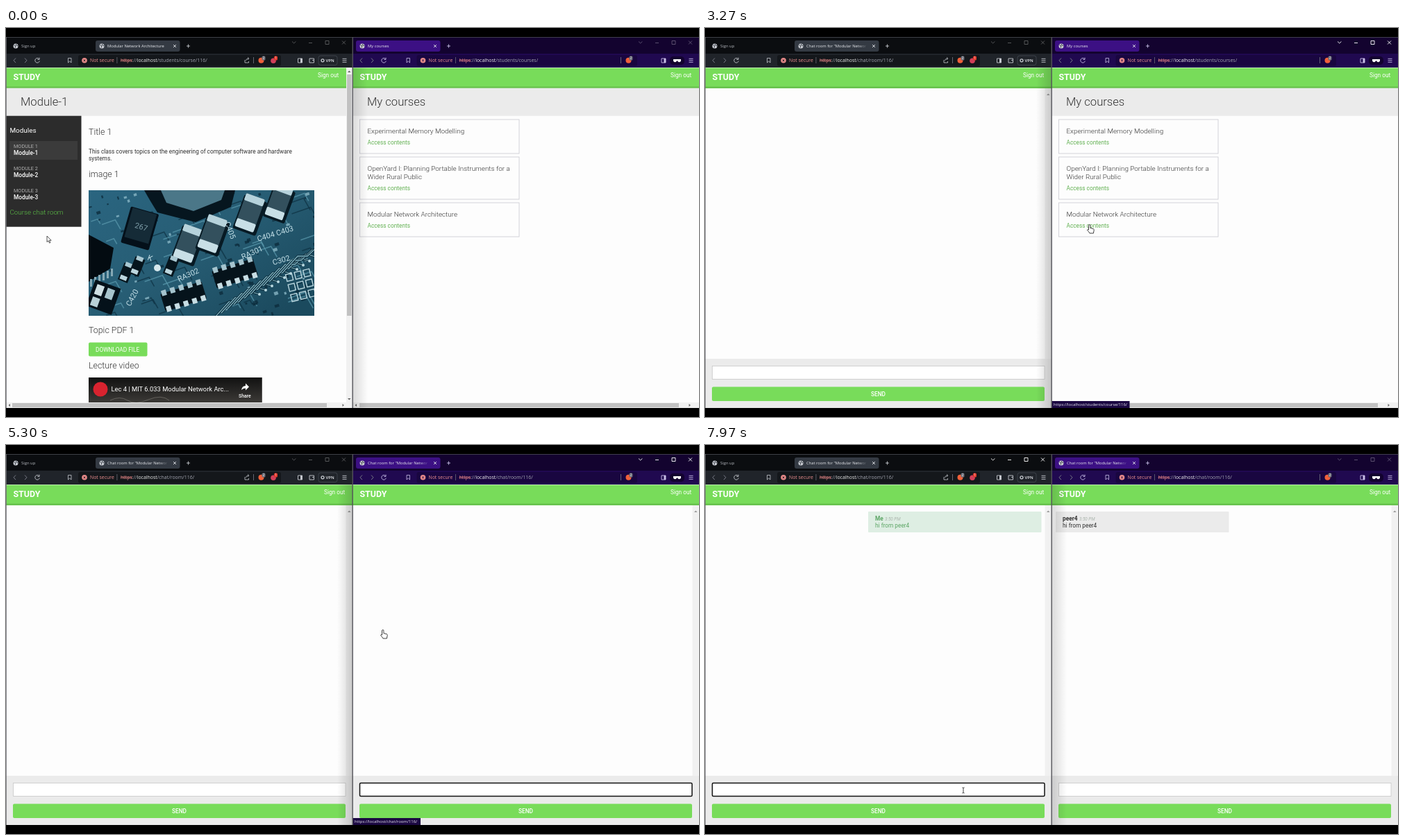
Recreate the animation shown at these times as an HTML page. Size 998 by 561 pixels, loop 8000 ms.

```html
<!DOCTYPE html>
<html lang="en">
<head>
<meta charset="utf-8">
<title>Course chat</title>
<style>
html,body{margin:0;width:100%;height:100%;overflow:hidden;background:#000}
svg{display:block;width:100vw;height:100vh}
text{font-family:Roboto,sans-serif;white-space:pre}
.ui{font-family:"Open Sans",sans-serif}
</style>
</head>
<body>
<svg id="stage" viewBox="0 0 998 561"></svg>
<script>
const LOOP = 8000, GREEN = '#78dc5a', LINK = '#63b153', INK = '#333';
const COURSE = 'Modular Network Architecture', SITE = 'STUDY', USER = 'peer4';
const MESSAGE = 'hi from ' + USER;
const HOST = '://localhost/';
const URLS = { course: 'students/course/116/', courses: 'students/courses/', chat: 'chat/room/116/' };

const rect = (x, y, w, h, fill, more = '') =>
  `<rect x="${x}" y="${y}" width="${w}" height="${h}" fill="${fill}" ${more}/>`;
const text = (x, y, size, fill, s, more = '') =>
  `<text x="${x}" y="${y}" font-size="${size}" fill="${fill}" ${more}>${s}</text>`;
const ui = (x, y, size, fill, s, more = '') => text(x, y, size, fill, s, `class="ui" ${more}`);
const line = (d, stroke, w = 0.9, more = '') =>
  `<path d="${d}" fill="none" stroke="${stroke}" stroke-width="${w}" ${more}/>`;
const dot = (x, y, r, fill) => `<circle cx="${x}" cy="${y}" r="${r}" fill="${fill}"/>`;
const group = (id, s, more = '') => `<g id="${id}" ${more}>${s}</g>`;
const LIGHT = 'font-weight="300"', MEDIUM = 'font-weight="500"', BOLD = 'font-weight="700"';

function globe(x) {
  return dot(x, 26, 3.5, '#c9ccd2') +
    line(`M${x - 2.6} 24.5l2.4 1.2l-.6 2.8M${x + .8} 23l-.4 1.6l2.6 1.2`, '#3a4048', 1);
}
const cross = (x, y, r, c) => line(`M${x - r} ${y - r}l${2 * r} ${2 * r}m0 ${-2 * r}l${-2 * r} ${2 * r}`, c);

// Circuit board picture, drawn in its own 325 x 181 box
function board() {
  let seed = 7;
  const rnd = () => (seed = seed * 16807 % 2147483647) / 2147483647;
  const part = (x, y, a, s) => `<g transform="translate(${x} ${y}) rotate(${a})">${s}</g>`;
  const cap = (x, y, k = 1) => part(x, y, 20, `<g transform="scale(${k})">` +
    rect(-17, -24, 37, 54, '#071a24', 'rx="3"') + rect(-15, -27, 30, 52, '#33505d', 'rx="2"') +
    rect(-15, -27, 30, 11, '#b6d2db', 'rx="2"') + rect(-15, 13, 30, 13, '#c8dfe6', 'rx="2"') + '</g>');
  const small = (x, y) => part(x, y, 22, rect(-7, -11, 15, 26, '#06151d') +
    rect(-5, -13, 10, 6, '#a9c8d2') + rect(-5, 7, 10, 6, '#bcd6de'));
  const array = (x, y) => {
    let s = rect(-31, -11, 62, 26, '#05131b', 'rx="2"');
    for (let i = 0; i < 5; i++) s += rect(-29 + i * 13, -15, 7, 8, '#a5c4ce') + rect(-29 + i * 13, 9, 7, 8, '#c7dde3');
    return part(x, y, -17, s);
  };
  const label = (x, y, a, s) => part(x, y, a, text(0, 0, 11, '#c4e0e8', s));
  let s = rect(0, 0, 325, 181, 'url(#pcb)');
  for (let i = 0; i < 60; i++) {
    const x = rnd() * 325, y = rnd() * 181, l = 8 + rnd() * 20;
    s += line(`M${x} ${y}l${l} ${-l * .35}l${l * .4} ${l * .7}`, i % 2 ? '#0d3142' : '#5b9aae', 1.6, 'opacity=".7"');
  }
  for (let i = 0; i < 90; i++)
    s += part(rnd() * 325, rnd() * 181, -18, rect(0, 0, 2 + rnd() * 5, 2 + rnd() * 3, i % 3 ? '#0b2a39' : '#8fbccb', 'opacity=".75"'));
  for (let i = 0; i < 12; i++) {
    const x = 182 + i * 9, y = 183 - i * 6;
    s += line(`M${x} ${y}l20 -22h14l16 -15l14 4`, '#0a2735', 3.2) + line(`M${x} ${y}l20 -22h14l16 -15l14 4`, '#7fb3c2', 1.3) +
      dot(x + 64, y - 33, 2, '#b9d8e0');
  }
  s += '<path d="M80 0H211L205 24L154 46L99 32L88 14Z" fill="#06161f"/><path d="M104 0H196L191 14L151 30L112 18Z" fill="#4b7788"/>';
  s += part(74, 54, 16, rect(-21, -26, 42, 54, '#04101a', 'rx="2"') + rect(-18, -25, 36, 44, '#152b37') + text(-8, 2, 11, '#7f9ea9', '267'));
  s += cap(143, 77, .95) + cap(178, 63, .95) + cap(232, 33, .95) + cap(274, 17, .9);
  s += '<path d="M0 64L36 83L31 113L0 132Z" fill="#030b11"/>';
  for (let i = 0; i < 6; i++) s += rect(2 + i * 6, 128 - i * 3, 3, 11, '#86a9b5');
  s += small(54, 117) + small(70, 108) + small(119, 108) + dot(99, 112, 5, '#d5e8ed');
  s += array(210, 118) + array(136, 151);
  s += part(18, 153, 20, rect(-16, -20, 39, 40, '#04111a') + rect(-11, -15, 11, 15, '#cfe0e4') + rect(5, -15, 11, 15, '#a7c4cd') + rect(-11, 4, 11, 13, '#b8d0d7'));
  s += label(130, 132, -24, 'RA302') + label(222, 100, -24, 'RA301') + label(244, 74, -17, 'C404 C403') +
    label(266, 108, -16, 'C302') + label(84, 100, 20, 'K') + label(196, 47, 70, 'C405') + label(60, 168, -62, 'C420');
  s += '<g fill="none" stroke="#b9d6de" stroke-width="1.4">';
  for (let i = 0; i < 9; i++) s += `<rect x="${286 + i % 3 * 13}" y="${118 + (i / 3 | 0) * 15}" width="9" height="10" transform="rotate(-14 300 130)"/>`;
  return s + '</g>';
}

function header(out) {
  return rect(0, 57.5, 499, 29.5, GREEN) + rect(0, 84.5, 499, 2.2, '#66bf4c') +
    text(10.5, 75, 12.4, '#fff', SITE, BOLD) + text(out, 70.5, 8.3, '#fff', 'Sign out');
}
const banner = s => rect(0, 86.7, 499, 40, '#ebebeb') + text(21, 112, 16.6, INK, s, LIGHT);

function hScroll(x, end) {
  return rect(0, 540, 499, 8, '#f1f1f1') + rect(x, 541, end - x, 6, '#c1c1c1') +
    '<path d="M6 542v4l-2.4-2zM484.5 542v4l2.4-2z" fill="#666"/>';
}

function coursePage(p) {
  let s = rect(0, 57, 499, 491, '#fdfdfd') + header(449) + banner('Module-1');
  s += rect(0, 126.7, 108.5, 160, '#2c2c2c') + text(5.5, 151, 9.9, '#fff', 'Modules') + rect(5, 163, 98, 27, '#3b3b3b');
  for (let i = 0; i < 3; i++)
    s += text(11, 173 + i * 32.2, 7.3, '#b0b0b0', 'MODULE ' + (i + 1)) +
      text(11, 183 + i * 32.2, 8.3, '#fff', 'Module-' + (i + 1), MEDIUM);
  s += text(5.5, 269, 9.8, '#5fc748', 'Course chat room', LIGHT);
  s += [['Title 1', 154], ['image 1', 215], ['Topic PDF 1', 440], ['Lecture video', 491]]
    .map(([t, y]) => text(119, y, 12.4, INK, t, LIGHT)).join('');
  s += text(119, 180.5, 8.3, INK, 'This class covers topics on the engineering of computer software and hardware') +
    text(119, 190.5, 8.3, INK, 'systems.');
  s += `<svg x="119" y="234" width="325" height="181" viewBox="0 0 325 181">${board()}</svg>`;
  s += rect(119, 453.5, 84.5, 20, GREEN, 'rx="2"') + text(129, 466.5, 8.3, '#fff', 'DOWNLOAD FILE');
  s += rect(119, 504, 249.5, 36, '#000');
  s += group(p + 'video', rect(119, 504, 249.5, 36, 'url(#film)') + line('M150 537q14 -7 25 0t30 -1t30 1', '#77756f', .7) +
    dot(136, 521, 10.5, '#d8232f') +
    text(151.5, 524, 9.4, '#fff', 'Lec 4 | MIT 6.033 Modular Network Arc...') +
    '<path d="M339 522q1-6 6-6v-3.5l5 5l-5 5v-3q-4 0-6 2.5z" fill="#fff"/>' + text(335, 532.5, 6.9, '#fff', 'Share', MEDIUM));
  s += rect(490, 57, 9, 483, '#f1f1f1') + rect(491, 67, 6.5, 348, '#c1c1c1') +
    '<path d="M492 64h4.6l-2.3-2.6zM492 534h4.6l-2.3 2.6z" fill="#666"/>';
  return s + hScroll(9, 462);
}

function coursesPage() {
  const card = (y, h, lines) => rect(10.5, y + .5, 229.5, h, '#fdfdfd', 'stroke="#c9c9d0" stroke-width=".8"') +
    lines.map((t, i) => text(21.5, y + 20.5 + i * 12, 9.9, INK, t, LIGHT)).join('') +
    text(21.5, y + h - 13, 8.3, LINK, 'Access contents');
  return rect(0, 57, 499, 491, '#fdfdfd') + header(458) + banner('My courses') +
    card(131.5, 49, ['Experimental Memory Modelling']) +
    card(185.5, 61, ['OpenYard I: Planning Portable Instruments for a', 'Wider Rural Public']) +
    card(251.5, 49, [COURSE]) + hScroll(10, 470);
}

function chatPage(p, mine) {
  const x = mine ? 235 : 6, ink = mine ? '#5da666' : INK, wide = mine ? 14 : 24;
  return rect(0, 57, 499, 491, '#fdfdfd') + header(458) +
    rect(489.5, 87, 9, 390, '#f1f1f1') + '<path d="M492 97h4.6l-2.3-2.6z" fill="#999"/>' +
    rect(0, 477, 499, 71, '#ebebeb') +
    group(p + 'msg', rect(x, 96, 249.5, 30, mine ? '#deeee3' : '#ebebeb', 'rx="1"') +
      text(x + 10, 109, 8.3, ink, mine ? 'Me' : USER, BOLD) +
      text(x + 10 + wide, 109, 6.3, '#a9b3ab', '3:50 PM', 'font-style="italic"') +
      text(x + 10, 119, 8.3, ink, MESSAGE)) +
    rect(10.5, 487.5, 478.5, 19, '#fff', `id="${p}input"`) + text(16, 500, 8.3, INK, '', `id="${p}typed"`) +
    rect(10, 517.5, 479, 20.5, GREEN, 'rx="2"') + text(249.5, 531, 8.3, '#fff', 'SEND', 'text-anchor="middle" ' + MEDIUM);
}

function chrome(p, k) {
  const c = k.icon, ax = k.tabX, dim = '#777a85';
  let s = rect(0, 13, 499, 535, k.bar) + rect(0, 37, 499, 20.5, k.tool) + rect(ax, 18, 121.5, 16, k.tab, 'rx="3"');
  if (ax > 100) s += globe(14) + ui(22, 28.2, 5.9, '#b7bac0', 'Sign up');
  s += group(p + 'icon', globe(ax + 9)) +
    group(p + 'spin', line(`M${ax + 9} 22.7a3.3 3.3 0 1 1 -3.3 3.3`, '#d8d2f0', 1) + dot(ax + 9, 26, 1, '#d8d2f0')) +
    ui(ax + 17, 28.2, 5.8, '#e8eaee', '', `id="${p}title"`) +
    rect(ax + 91, 19, 14, 14, `url(#${p}fade)`, `id="${p}cut"`) + rect(ax + 104, 19, 16, 14, k.tab) +
    cross(ax + 114, 26, 2, '#dfe1e6') + line(`M${ax + 131} 26h5m-2.5-2.5v5`, c);
  s += group(p + 'ctl', line('M412 19.5l2.7 2.5l2.7-2.5M436 21.5h5M460 18.5h5v5h-5z', '#fff') + cross(486.5, 21, 2.5, '#fff'));
  s += line('M14 43.5l-3 3.3l3 3.3', dim, 1) + line('M27 43.5l3 3.3l-3 3.3', dim, 1) +
    group(p + 'reload', line('M47.5 44.5a3.3 3.3 0 1 0 .8 3.2M48 42.7v2.7h-2.7', c)) +
    group(p + 'stop', cross(45, 46.8, 2.3, c));
  const u = k.urlX;
  s += line(`M${u - 75.5} 43.5h4.5v6.5l-2.25-2l-2.25 2z`, c, .8) +
    rect(u - 61, 39, k.fieldEnd - u + 61, 16, k.field, 'rx="3"') +
    dot(u - 52, 46.8, 3.8, '#e88a8a') + cross(u - 52, 46.8, 1.3, k.field) +
    ui(u - 44, 49.3, 6.9, '#ee9090', 'Not secure') + rect(u - 5.5, 42, .8, 9, '#666a74') +
    ui(u, 49.3, 6.95, '#a3a5b0', `<tspan fill="#ee8a8a" text-decoration="line-through">https</tspan>:/` +
      `/<tspan fill="#eee">localhost</tspan>/<tspan id="${p}url"></tspan>`);
  const b = k.shield;
  s += rect(b - 11.5, 42, .8, 9, '#777a85') + dot(b, 46.8, 4, '#f0603a') +
    group(p + 'badge', rect(b + 1, 40.5, 5, 6, '#6a6d78', 'rx="1.5"') + ui(b + 2.2, 45.3, 4.4, '#fff', '2'));
  if (k.extra) {
    s += line('M344 46v4h5.5v-2M345.5 47q.5-3 4-3m-1.5-1.7l1.8 1.7l-1.8 1.7', c, .8) +
      dot(385, 47.3, 3.8, '#d0405a') + rect(386, 40.5, 5, 6, '#e0392c', 'rx="1.5"') + ui(387.3, 45.3, 4.4, '#fff', '1') +
      line('M437 44h6.5v6h-6.5zM441 46.5h2.5', c, .9) +
      rect(450, 40, 27, 13.5, 'none', 'rx="3" stroke="#4a5058" stroke-width=".7"') +
      `<circle cx="456" cy="46.8" r="2" fill="none" stroke="${c}" stroke-width="1.3"/>` + ui(460.5, 49, 6, '#e8eaee', 'VPN', 'font-weight="600"');
  } else {
    s += rect(457, 41, 21, 12, k.bar, 'rx="5"') +
      '<path d="M462 45h11v2.2q-.5 2-2.5 2t-2.5-2h-1q-.5 2-2.5 2t-2.5-2z" fill="#fff"/>';
  }
  const sx = k.extra ? 420.5 : 445;
  s += line(`M${sx} 44h6v6h-6z`, c) + rect(sx + 3.5, 44, 2.5, 6, c) + line('M484.5 44.3h6m-6 2.5h6m-6 2.5h6', c, .9);
  return s;
}

const skins = {
  L: { bar: '#0b0d10', tool: '#20242a', field: '#14171b', tab: '#343a43', icon: '#c6c9cf', tabX: 129, urlX: 165, fieldEnd: 396, shield: 367.5, extra: true },
  R: { bar: '#13032f', tool: '#200950', field: '#190640', tab: '#3c1084', icon: '#c9bfe8', tabX: 5, urlX: 153.5, fieldEnd: 410, shield: 397.5 }
};

function browser(p, x) {
  const k = skins[p];
  return `<svg x="${x}" y="0" width="499" height="561" viewBox="0 0 499 561">` +
    chrome(p, k) + group(p + 'course', coursePage(p)) +
    (p === 'R' ? group(p + 'courses', coursesPage()) : '') + group(p + 'chat', chatPage(p, p === 'L')) +
    group(p + 'shade', rect(p === 'L' ? 477 : 0, 57, 22, 491, `url(#${p}dark)`)) +
    group(p + 'status', rect(0, 538, 98, 10, p === 'L' ? '#101215' : '#1b0842', `id="${p}box"`) +
      ui(3, 545.3, 5.9, '#e6e6ee', '', `id="${p}link"`)) +
    rect(0, 13, 499, .7, '#55585f') + rect(0, 13, .8, 535, '#6a6a70') + '</svg>';
}

const stop = (o, c, a = 1) => `<stop offset="${o}" stop-color="${c}" stop-opacity="${a}"/>`;
const grad = (id, stops, dir = '') => `<linearGradient id="${id}" ${dir}>${stops}</linearGradient>`;
const hand = 'M-1.5 1q0-1.5 1.2-1.5t1.2 1.5v3.5l4.5 1.2q1 .4 .8 1.8l-.8 4.5h-5.4q-1.5-2.6-3.5-4.6q.4-1.6 2 -.4z';
const stage = document.getElementById('stage');
stage.innerHTML = '<defs>' +
  grad('pcb', stop(0, '#2a6580') + stop(.5, '#275d74') + stop(1, '#1b4a5e'), 'x2="1" y2=".8"') +
  grad('film', stop(0, '#111') + stop(1, '#3c3a37'), 'x2="0" y2="1"') +
  grad('Ldark', stop(0, '#000', 0) + stop(1, '#000', .16)) + grad('Rdark', stop(0, '#000', .14) + stop(1, '#000', 0)) +
  ['L', 'R'].map(p => grad(p + 'fade', stop(0, skins[p].tab, 0) + stop(1, skins[p].tab))).join('') + '</defs>' +
  rect(0, 0, 998, 561, '#000') + browser('L', 0) + browser('R', 499) + rect(498.5, 13, 1, 535, '#4a4a50') +
  group('pointer',
    group('arrow', '<path d="M0 0v8.6l2-1.8l1.5 3.3l1.4-.6l-1.5-3.2h2.7z" fill="#fff" stroke="#111" stroke-width=".7"/>') +
    group('hand', `<path d="${hand}" fill="#fff" stroke="#111" stroke-width=".8"/>`) +
    group('beam', line('M-1.6 -4q1.6 0 1.6 .8v6.4q0 .8 -1.6 .8M1.6 -4q-1.6 0-1.6 .8m0 6.4q0 .8 1.6 .8', '#111', .8)));

const $ = Object.fromEntries([...stage.querySelectorAll('[id]')].map(e => [e.id, e]));
const show = (id, on) => { if ($[id]) $[id].style.display = on ? '' : 'none'; };
const within = (t, a, b) => t >= a && t < b;

// Pointer stops: time, x, y
const path = [[0, 59, 300], [450, 59, 300], [1200, 54, 265], [1750, 54, 265], [2250, 249, 256], [2500, 249, 256],
  [3100, 554, 284], [3400, 554, 284], [3650, 556, 286.5], [4100, 556, 286.5], [4550, 543, 267], [5450, 543, 267],
  [6350, 372, 498], [LOOP, 372, 498]];
function pointerAt(t) {
  const i = path.findIndex(k => k[0] > t), [t0, x0, y0] = path[i - 1], [t1, x1, y1] = path[i];
  const u = (t - t0) / (t1 - t0), e = u * u * (3 - 2 * u);
  return [x0 + (x1 - x0) * e, y0 + (y1 - y0) * e];
}

function drawWindow(p, s) {
  for (const name in URLS) show(p + name, s.page === name);
  const title = s.page === 'chat' ? `Chat room for "${COURSE.slice(0, 14)}` : s.page === 'course' ? COURSE : 'My courses';
  $[p + 'title'].textContent = title;
  $[p + 'url'].textContent = URLS[s.page];
  show(p + 'cut', s.page === 'chat');
  show(p + 'icon', !s.loading);
  show(p + 'spin', s.loading);
  show(p + 'reload', !s.loading);
  show(p + 'stop', s.loading);
  show(p + 'badge', !s.loading);
  show(p + 'video', !s.loading || p === 'L');
  $[p + 'ctl'].setAttribute('opacity', s.active ? 1 : .33);
  show(p + 'shade', s.shaded);
  show(p + 'status', s.link);
  if (s.link) {
    $[p + 'link'].textContent = 'https' + HOST + URLS[s.link];
    $[p + 'box'].setAttribute('width', s.link === 'chat' ? 98 : 112.5);
  }
  const focus = s.active && s.page === 'chat';
  $[p + 'input'].setAttribute('stroke', focus ? '#111' : '#c8c8c8');
  $[p + 'input'].setAttribute('stroke-width', focus ? 1.5 : .8);
  $[p + 'input'].setAttribute('rx', focus ? 1.5 : 0);
  $[p + 'typed'].textContent = s.typed || '';
  show(p + 'msg', s.sent);
}

function draw(t) {
  const left = within(t, 1600, 3250) || t >= 6450, right = within(t, 3250, 6450), sent = t >= 7860;
  const count = Math.max(0, Math.min(MESSAGE.length, Math.floor((t - 7030) / 52)));
  drawWindow('L', {
    page: t < 1850 ? 'course' : 'chat', active: left, shaded: right, sent,
    loading: within(t, 1620, 2000), link: within(t, 1130, 1900) && 'chat',
    typed: sent ? '' : MESSAGE.slice(0, count)
  });
  drawWindow('R', {
    page: t < 3600 ? 'courses' : t < 5120 ? 'course' : 'chat', active: right, shaded: !right, sent,
    loading: within(t, 3300, 3900) || within(t, 4900, 5200),
    link: within(t, 3050, 3850) ? 'course' : within(t, 4480, 5500) && 'chat'
  });
  const [x, y] = pointerAt(t);
  const onLink = within(t, 1130, 1900) || within(t, 3050, 3600) || within(t, 4480, 5500), onInput = t >= 6270;
  $.pointer.setAttribute('transform', `translate(${x.toFixed(2)} ${y.toFixed(2)})`);
  show('hand', onLink);
  show('beam', onInput);
  show('arrow', !onLink && !onInput);
}

const start = performance.now();
function tick() {
  draw((performance.now() - start) % LOOP);
  requestAnimationFrame(tick);
}
tick();
</script>
</body>
</html>
```
